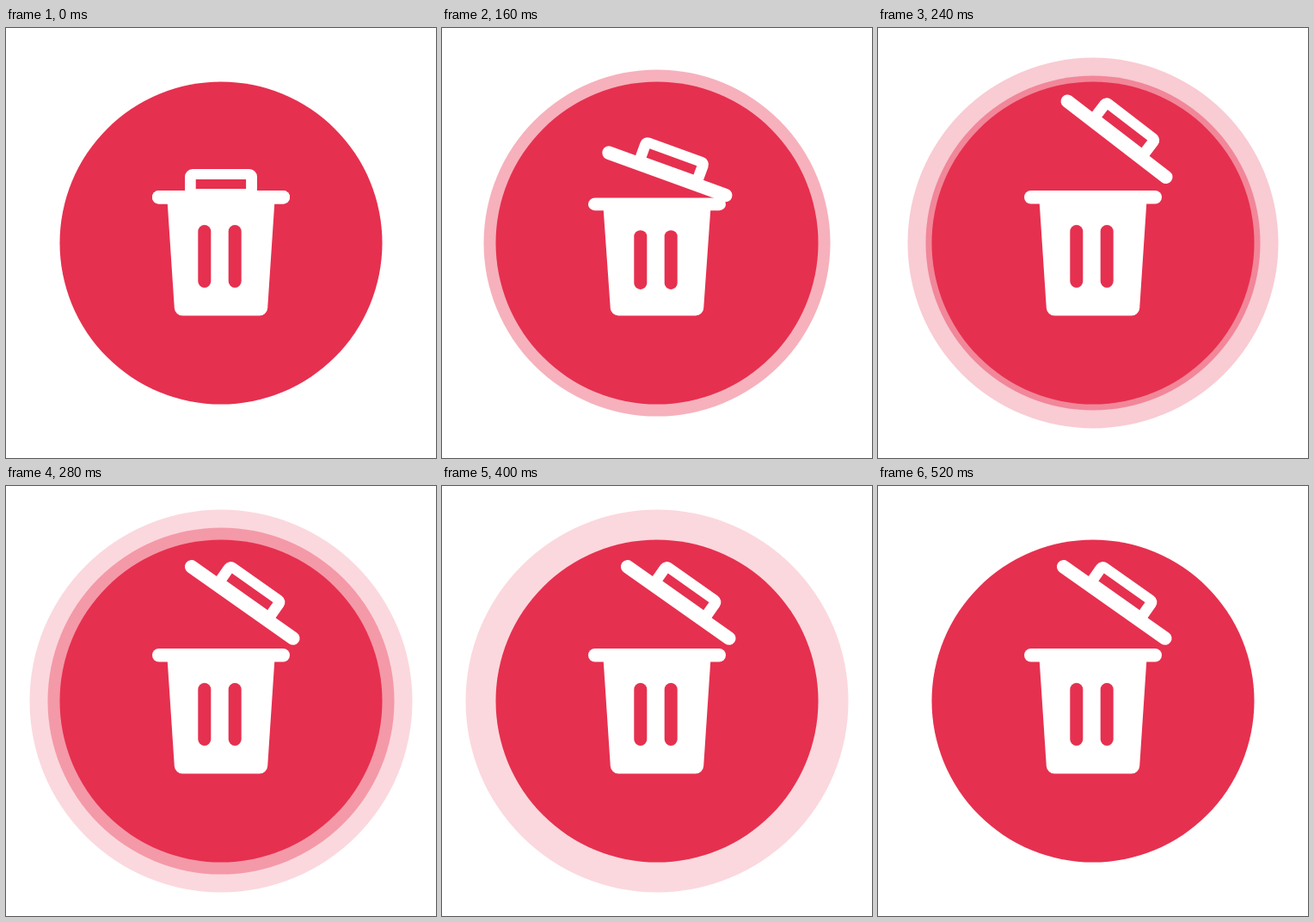
Animation of 500 by 500 pixels, one loop 1200 ms. Source, as an HTML page with a canvas:

```html
<!DOCTYPE html>
<html lang="en">
<head>
<meta charset="utf-8">
<title>Trash bin</title>
<style>
  html, body { margin: 0; width: 100%; height: 100%; overflow: hidden; background: #fff; }
  canvas { display: block; width: 500px; height: 500px; }
</style>
</head>
<body>
<canvas id="stage"></canvas>
<script>
const LOOP = 1200, STEP = 20;
const RED = '#e6304f', WHITE = '#fff';
const canvas = document.getElementById('stage');
const ctx = canvas.getContext('2d');
const dpr = window.devicePixelRatio || 1;
canvas.width = canvas.height = 500 * dpr;

const lerp = (a, b, p) => a + (b - a) * p;
const bend = (a, c, b, p) => lerp(lerp(a, c, p), lerp(c, b, p), p);

function ease(t, from, to) {
  const p = Math.min(1, Math.max(0, (t - from) / (to - from)));
  return p * p * (3 - 2 * p);
}

function disc(r, alpha) {
  ctx.globalAlpha = alpha;
  ctx.fillStyle = RED;
  ctx.beginPath();
  ctx.arc(250, 250, r, 0, Math.PI * 2);
  ctx.fill();
  ctx.globalAlpha = 1;
}

function pill(x, y, w, h, color) {
  ctx.fillStyle = color;
  ctx.beginPath();
  ctx.roundRect(x, y, w, h, Math.min(w, h) / 2);
  ctx.fill();
}

function ring(t, start) {
  const age = t - start;
  if (age <= 0 || age >= 320) return;
  disc(187.5 + age * 0.175, 0.5 * (1 - age / 320));
}

// The bin squashes towards its base
function bin(scale) {
  ctx.save();
  ctx.translate(0, 334.5);
  ctx.scale(1, scale);
  ctx.translate(0, -334.5);
  pill(170, 189, 160, 15.5, WHITE);
  ctx.beginPath();
  ctx.moveTo(187.5, 200);
  ctx.lineTo(312.5, 200);
  ctx.arcTo(303.6, 334.5, 250, 334.5, 9.5);
  ctx.arcTo(196.4, 334.5, 187.5, 200, 9.5);
  ctx.closePath();
  ctx.fill();
  pill(223.3, 229, 15, 73, RED);
  pill(258.7, 229, 15, 73, RED);
  ctx.restore();
}

// The lid turns about its right end
function lid(x, y, degrees) {
  ctx.save();
  ctx.translate(322.5 + x, 196.75 + y);
  ctx.rotate(degrees * Math.PI / 180);
  ctx.translate(-322.5, -196.75);
  pill(170, 189, 160, 15.5, WHITE);
  ctx.beginPath();
  ctx.roundRect(208, 164, 84, 30, [9, 9, 0, 0]);
  ctx.rect(220.7, 176, 58.4, 11);
  ctx.fill('evenodd');
  ctx.restore();
}

function draw(t) {
  ctx.setTransform(dpr, 0, 0, dpr, 0, 0);
  ctx.fillStyle = WHITE;
  ctx.fillRect(0, 0, 500, 500);
  ring(t, 80);
  ring(t, 200);
  disc(187.5, 1);

  const down = ease(t, 34, 100);
  const up = ease(t, 100, 220);
  const settle = ease(t, 220, 260);
  bin(1 - 0.118 * (down - up));
  lid(
    bend(0, 8.25, 13.5, up) - 2 * settle,
    bend(17.5 * down, 1 * up, -27, up) + 7.5 * settle,
    40 * up - 4.8 * settle
  );
}

function tick() {
  const t = performance.now() % LOOP;
  draw(Math.floor(t / STEP) * STEP);
  requestAnimationFrame(tick);
}
tick();
</script>
</body>
</html>
```
